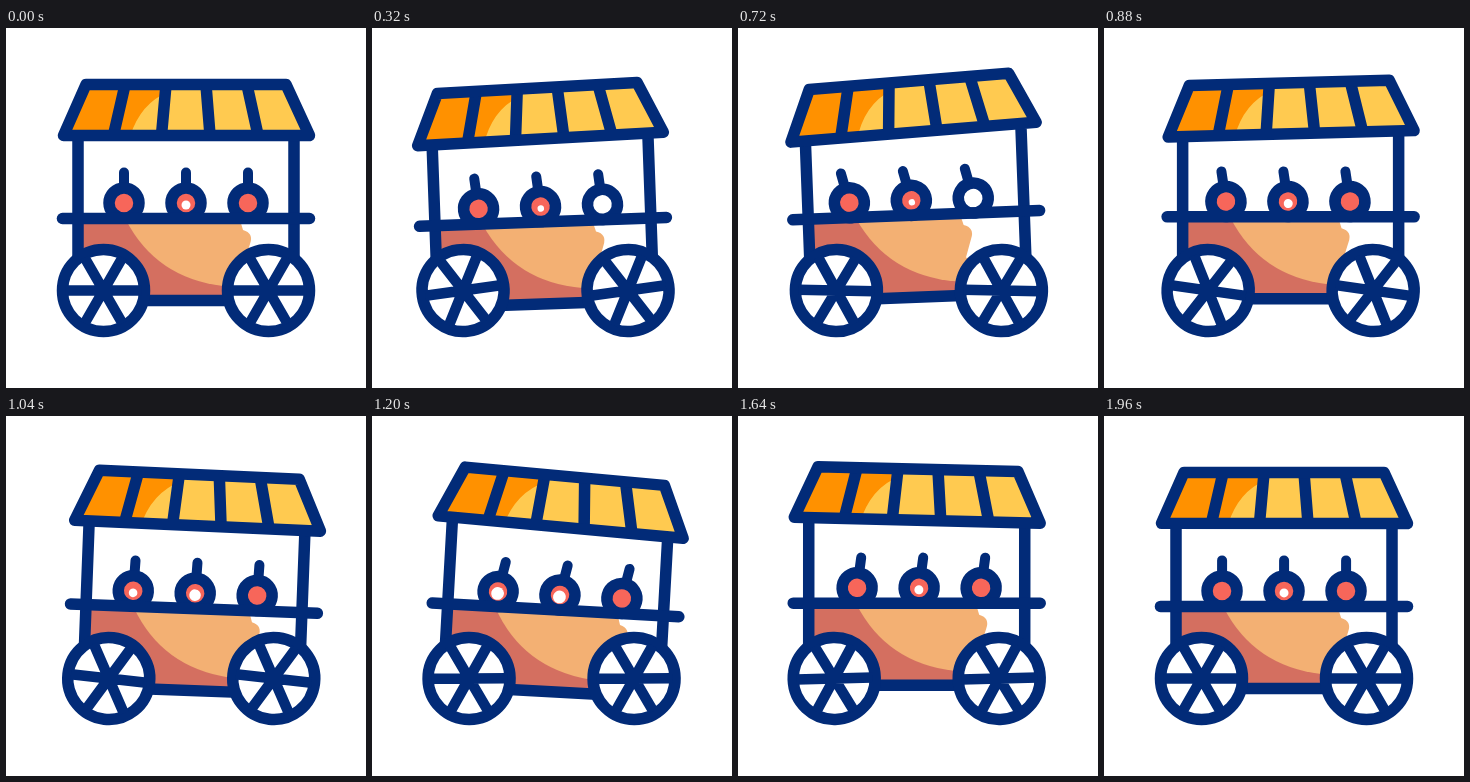
Animation, 360 px wide and 360 px high, one loop 2000 ms. Source, as an HTML page:

```html
<!DOCTYPE html>
<html lang="en">
<head>
<meta charset="utf-8">
<title>Rolling food cart</title>
<style>
html, body { margin: 0; width: 100%; height: 100%; overflow: hidden; background: #fff; }
svg { display: block; width: 100vw; height: 100vh; }
.line { fill: none; stroke: #022b78; stroke-width: 11.5; stroke-linecap: round; stroke-linejoin: round; }
.flat { stroke-linecap: butt; }
</style>
</head>
<body>
<svg viewBox="0 0 360 360">
  <defs>
    <clipPath id="roof"><path d="M80 56.5H280L303.5 107.5H57.5Z"/></clipPath>
    <g id="wheel">
      <circle class="line" r="41" style="fill:#fff"/>
      <path class="line flat" style="stroke-width:10.5" d="M-38 0H38M-19 -33L19 33M19 -33L-19 33"/>
    </g>
  </defs>
  <g id="body">
    <path fill="#d46f60" d="M75 192H285V270H75Z"/>
    <path fill="#f3b073" d="M120 192Q150 250 217 258L285 264V192Z"/>
    <path id="gap" fill="#fff" d="M-6 192L-3 202Q8 205 4 216L-2 235H60V192Z"/>
    <path class="line flat" d="M72 108V236M288 108V236M125 272.5H235"/>
    <g id="bells"></g>
    <path class="line" d="M56.5 190.5H303.5"/>
    <g id="awning">
      <g clip-path="url(#roof)">
        <path fill="#ffca50" d="M50 50H310V112H50Z"/>
        <path fill="#ff9100" d="M50 50H162V64Q133 76 123 112H50Z"/>
      </g>
      <path class="line flat" d="M119 57L107.5 107M160 57L155.5 107M200 57L204 107M241 57L252 107"/>
      <path class="line" d="M80 56.5H280L303.5 107.5H57.5Z"/>
    </g>
  </g>
  <use id="left" href="#wheel"/>
  <use id="right" href="#wheel"/>
</svg>
<script>
const LOOP = 2000, STEP = 40, WHEEL_R = 46.5;
const $ = id => document.getElementById(id);
const clamp = (v, top = 1) => Math.min(top, Math.max(0, v));
const smooth = u => (1 - Math.cos(Math.PI * clamp(u))) / 2;
const place = (node, transform) => node.setAttribute("transform", transform);

// Eases from rest to a first peak, swings through half waves to a last peak, then eases back to rest.
function swing(t, size, first, last, end, halves, fade = 0) {
  const u = clamp((t - first) / (last - first));
  const ramp = smooth(t / first) * smooth((end - t) / (end - last));
  return size * ramp * (1 - fade * u * u) * Math.cos(Math.PI * halves * u);
}

const bellX = i => 118 + 62 * i;
const bells = Array.from({ length: 3 }, (_, i) => {
  const bell = document.createElementNS("http://www.w3.org/2000/svg", "g");
  bell.innerHTML = `
    <path class="line" style="stroke-width:10" d="M0 -48.5V-33"/>
    <circle cy="-18" r="15" fill="#f7665a"/>
    <circle class="shine" cy="-16" fill="#fff"/>
    <circle class="line" cy="-18" r="15"/>`;
  return $("bells").appendChild(bell);
});

function draw(t) {
  const x = swing(t, -8.2, 460, 1430, 1800, 2, 0.6);
  const y = swing(t, 3.4, 300, 1600, LOOP, 3);
  const lean = swing(t, -3.2, 540, 1220, 1660, 1);
  const sway = swing(t, -2.5, 700, 1320, LOOP, 1);
  place($("body"), `translate(${x} ${y}) rotate(${lean} 180 262)`);
  place($("awning"), `rotate(${sway} 180 108)`);
  place($("gap"), `translate(${240 + 4 * sway} 0)`);

  const turn = x / WHEEL_R * 180 / Math.PI;
  place($("left"), `translate(${97.5 + x} 262.5) rotate(${turn})`);
  place($("right"), `translate(${262.5 + x} 262.5) rotate(${turn})`);

  // The shine moves between the bells as the cart leans.
  const shine = [2 * lean, 4.5 + 0.6 * lean, -6 * lean];
  bells.forEach((bell, i) => {
    place(bell, `translate(${bellX(i)} 193) rotate(${sway * 5.6})`);
    bell.querySelector(".shine").setAttribute("r", clamp(shine[i], 12));
  });
}

function frame(now) {
  draw(Math.floor(now % LOOP / STEP) * STEP);
  requestAnimationFrame(frame);
}
draw(0);
requestAnimationFrame(frame);
</script>
</body>
</html>
```
